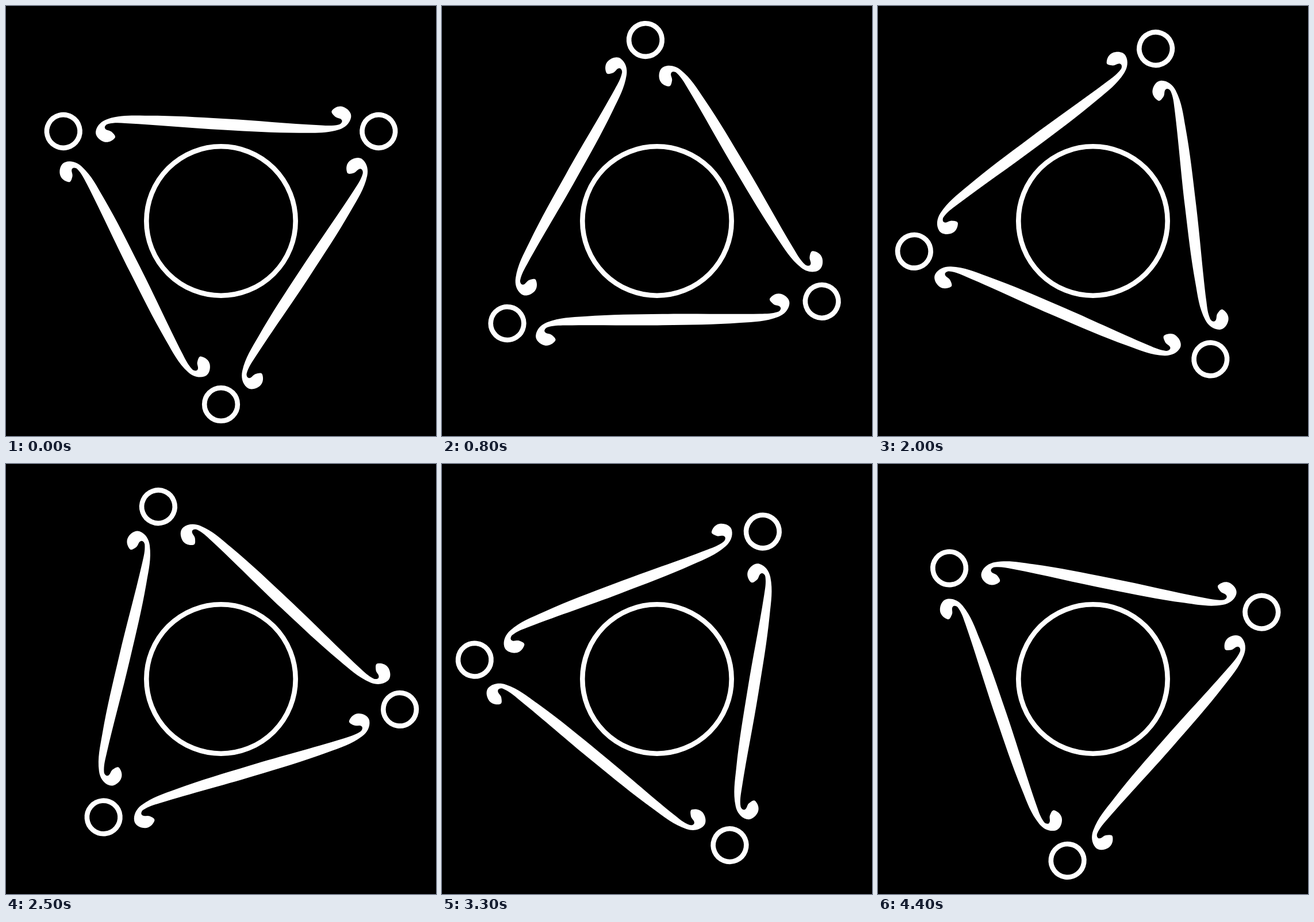
An HTML page with a canvas that plays this animation: 748x748 px, repeating every 4.5 s.

```html
<!DOCTYPE html>
<html lang="en">
<head>
<meta charset="utf-8">
<title>Turning triangle</title>
<style>
  html, body { margin: 0; width: 100%; height: 100%; overflow: hidden; background: #000; }
  canvas { display: block; width: 748px; height: 748px; }
</style>
</head>
<body>
<canvas id="stage" width="748" height="748"></canvas>
<script>
const ctx = document.getElementById('stage').getContext('2d');
const SIZE = 748, MID = SIZE / 2;
const STEP = 100, COUNT = 45;      // ms per step, steps per turn
const TURN = Math.PI * 2;

// Key points of half a scroll bar: tapered stem, then the hook and back.
const half = [
  [0, -9.8], [-135, -15], [-201, -9.3], [-222, 12], [-208.5, 30.2],
  [-189, 24], [-194, 13.5], [-206, 7], [-201, -0.5], [-170, -1.8]
];
const bar = smooth([...half, ...half.map(([x, y]) => [-x, -y])]);

// Closed curve through points; each tangent is parallel to its neighbours' chord.
function smooth(points) {
  const n = points.length;
  const at = i => points[(i + n) % n];
  const span = (a, b) => Math.hypot(b[0] - a[0], b[1] - a[1]);
  const handle = (i, reach) => {
    const p = at(i), a = at(i - 1), b = at(i + 1), k = reach / span(a, b);
    return [p[0] + (b[0] - a[0]) * k, p[1] + (b[1] - a[1]) * k];
  };
  const path = new Path2D();
  path.moveTo(...at(0));
  for (let i = 0; i < n; i++) {
    const reach = 0.36 * span(at(i), at(i + 1));
    path.bezierCurveTo(...handle(i, reach), ...handle(i + 1, -reach), ...at(i + 1));
  }
  path.closePath();
  return path;
}

function ring(x, y, r) {
  ctx.beginPath();
  ctx.arc(x, y, r, 0, TURN);
  ctx.stroke();
}

function draw(step) {
  ctx.setTransform(1, 0, 0, 1, 0, 0);
  ctx.fillStyle = '#000';
  ctx.fillRect(0, 0, SIZE, SIZE);
  ctx.fillStyle = ctx.strokeStyle = '#fff';
  ctx.lineWidth = 8.6;
  ctx.translate(MID, MID);
  ring(0, 0, 129.7);

  ctx.rotate(-step / COUNT * TURN);
  ctx.translate(0, 2.3);           // the triangle sits slightly off the pivot
  for (let i = 0; i < 3; i++) {
    ring(0, 316.7, 28.8);
    ctx.save();
    ctx.translate(4.2, -170.6);
    ctx.fill(bar);
    ctx.restore();
    ctx.rotate(TURN / 3);
  }
}

const t0 = performance.now();
function tick() {
  draw(Math.floor((performance.now() - t0) / STEP) % COUNT);
  requestAnimationFrame(tick);
}
tick();
</script>
</body>
</html>
```
